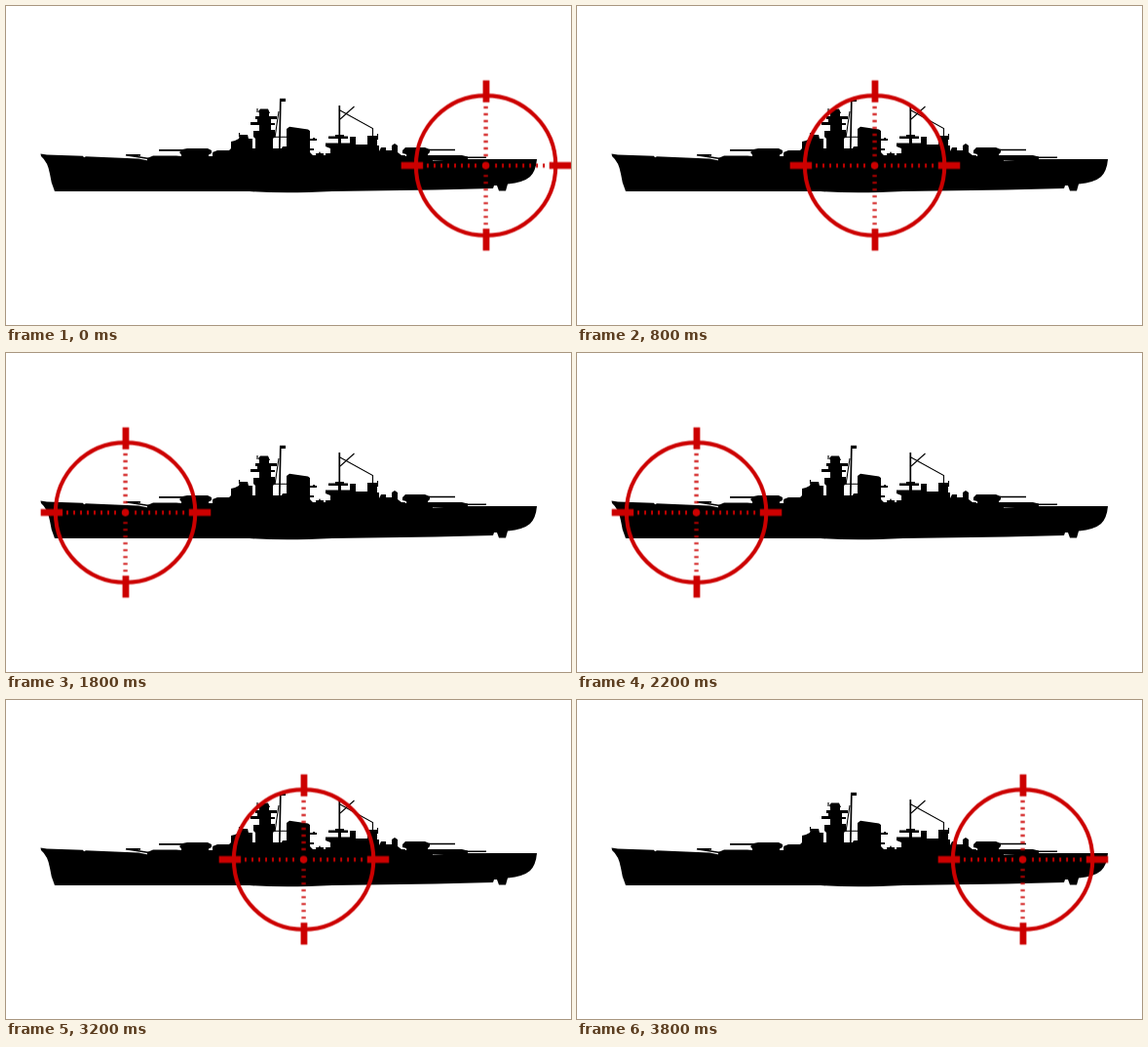
Write an HTML page that moves like this. It is 580x327 px and loops after 4 s.

```html
<!DOCTYPE html>
<html lang="en">
<head>
<meta charset="utf-8">
<title>Ship in the crosshair</title>
<style>
  html, body { margin: 0; width: 100%; height: 100%; overflow: hidden; background: #fff; }
  svg { display: block; width: 580px; height: 327px; }
  .wire { fill: none; stroke: #000; }
  .sight { fill: none; stroke: #c00; animation: sweep 4s step-end infinite; }
  .bars { stroke-width: 6.8; }
  .ticks { stroke-width: 4.4; stroke-dasharray: 1.9 5.1; }

  /* The sight jumps every 200 ms and returns along the same stops. */
  @keyframes sweep {
    0%, 100% { transform: translate(492.9px, 163.5px); }
    5%, 95%  { transform: translate(457.9px, 163.5px); }
    10%, 90% { transform: translate(411.7px, 163.5px); }
    15%, 85% { transform: translate(352.7px, 163.5px); }
    20%, 80% { transform: translate(305.9px, 163.5px); }
    25%, 75% { transform: translate(259.7px, 163.5px); }
    30%, 70% { transform: translate(227.9px, 163.5px); }
    35%, 65% { transform: translate(193.7px, 163.5px); }
    40%, 60% { transform: translate(158.7px, 163.5px); }
    45%, 55% { transform: translate(122.9px, 163.5px); }
    50%      { transform: translate(87.5px, 163.5px); }
  }
</style>
</head>
<body>
<svg viewBox="0 0 580 327">
  <defs>
    <path id="arm" d="M9.6 0H61"/>
  </defs>

  <g id="ship">
    <!-- hull -->
    <path d="M35.500 151.500L42 152.500 79 153.800 80 155.300 82 154.300 136 156.500 146 158.500H438L474 157H545
      Q544 169 538 175 Q531 181 515 182.500L513 189.500H506L504 184H501L500 187 440 188.500 335 190
      Q285 192.500 250 190H50Q46 181 45 172 Q43 160 36 154Z"/>
    <!-- forward turrets -->
    <path d="M145 159V156L151 153.500H175L180 154V152.500L178 150 181 147 186 146H207L211 148V151L208 152.500V159Z"/>
    <!-- bridge block -->
    <path d="M204 159V154H212V150L217 148H229L231 146V139L235 138 239 136 240 132H248L249 136H253V146H256V136
      L254 134V128H260V122H251V119H258V116H256V113H260V110L259 108 261 105.500H269L271 110H270V113H278V116H272V120H276V122H272
      V127H276V134L274 136V146H283L284 144H288V126L291 123.800 310 126.500 312 128V150L315 153H328V151H333V146L328 144V140.500H341
      V136H331V133.500H338V132H347V133.500H351V136H344V140.500H353V134H359V142H371V133H381V143H383V149L385 145H390V148H396
      V143L399 141 402 143V150L406 153H410V159Z"/>
    <!-- small platforms beside the funnel -->
    <path d="M312 136H315V135H317V136H319V138H312ZM312 146H316V148H312ZM318 151H321L322 149 323 151H326V153H318Z"/>
    <!-- aft turrets -->
    <path d="M408 159V154H411V152L407 151V148L410 145H430L435 147V150L433 152V153H468L474 154.500V158H438V159Z"/>
    <path d="M281 94.800H287V98H281Z"/>
    <!-- guns -->
    <path class="wire" stroke-width="1.6" d="M123 152.700L147 156.500M124 152.900H138M157 147.900H182M434 147.500H461M472 155.300H493"/>
    <!-- masts and rigging -->
    <path class="wire" stroke-width="1.7" d="M281.800 96L280.800 147M342.300 102V140"/>
    <path class="wire" stroke-width="1.1" d="M280 108L276 135M274 134.300H289M342 106.500L376.500 125.500V134
      M357.500 103L343 116M381.500 131V137M258 105V109M239.500 130V134"/>
  </g>

  <g class="sight">
    <path class="bars" d="M-87.300 0H-64.800M64.800 0H87.300M0-87.300V-64.800M0 64.800V87.300"/>
    <g transform="translate(-.4 .1)">
      <circle r="71.700" stroke-width="4.100"/>
      <g class="ticks">
        <use href="#arm"/>
        <use href="#arm" transform="rotate(90)"/>
        <use href="#arm" transform="rotate(180)"/>
        <use href="#arm" transform="rotate(270)"/>
      </g>
      <circle r="3.800" fill="#c00" stroke="none"/>
    </g>
  </g>
</svg>
</body>
</html>
```
